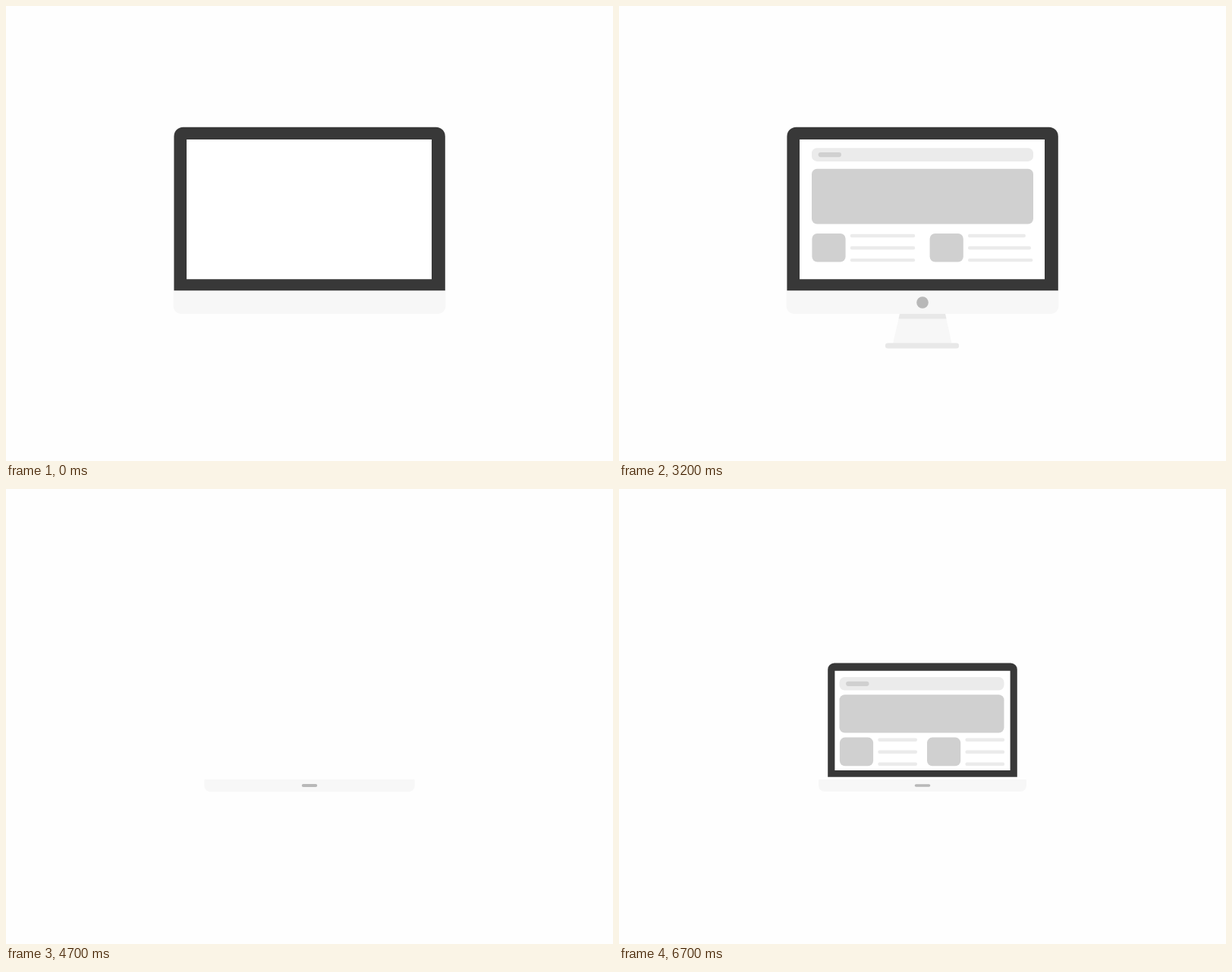
An HTML page with a canvas that plays this animation: 800 by 600 pixels, repeating every 8000 ms.

```html
<!DOCTYPE html>
<html lang="en">
<head>
<meta charset="utf-8">
<title>Desktop to laptop</title>
<style>
  html, body { margin: 0; width: 100%; height: 100%; overflow: hidden; background: #fefefe; }
  canvas { display: block; width: 800px; height: 600px; }
</style>
</head>
<body>
<canvas id="stage" width="800" height="600"></canvas>
<script>
const ctx = document.getElementById('stage').getContext('2d');
const LOOP = 8000, STEP = 100;
const DARK = '#383838', PALE = '#f7f7f7', LIGHT = '#ebebeb', MID = '#d0d0d0', KNOB = '#b8b8b8';

const progress = (t, start, length) => Math.min(1, Math.max(0, (t - start) / length));
const easeOut = p => 1 - (1 - p) ** 2;
const easeIn = p => p * p;
const mix = (a, b, p) => a + (b - a) * p;

function box(x, y, w, h, radii, color) {
  if (w <= 0 || h <= 0) return;
  ctx.fillStyle = color;
  ctx.beginPath();
  ctx.roundRect(x, y, w, h, radii);
  ctx.fill();
}

function polygon(color, ...points) {
  ctx.fillStyle = color;
  ctx.beginPath();
  points.forEach(([x, y]) => ctx.lineTo(x, y));
  ctx.fill();
}

// Draws a box scaled about the point (ox, oy), given as fractions of its size.
function scaledBox(x, y, w, h, r, color, sx, sy, ox, oy) {
  if (sx <= 0 || sy <= 0) return;
  ctx.save();
  ctx.translate(x + w * ox, y + h * oy);
  ctx.scale(sx, sy);
  box(-w * ox, -h * oy, w, h, r, color);
  ctx.restore();
}

const growRight = (x, y, w, h, r, color, s) => scaledBox(x, y, w, h, r, color, s, 1, 0, 0);
const growTall = (x, y, w, h, r, color, s) => scaledBox(x, y, w, h, r, color, 1, s, 0.5, 0.5);
const pop = (x, y, w, h, r, color, s) => scaledBox(x, y, w, h, r, color, s, s, 0.5, 0.5);

const enterAt = {
  nav: 0, hero: 190, label: 250,
  tiles: [400, 720],
  lines: [[500, 550, 600], [800, 850, 900]]
};
const leaveAt = {
  nav: 580, hero: 378, label: 300,
  tiles: [280, 120],
  lines: [[230, 280, 332], [0, 50, 100]]
};

const desktopPage = { x: 254, y: 187.3, w: 292, heroY: 214.7, heroH: 72.8, tileY: 299.9, column: 155.2, lineW: 85.3 };
const laptopPage = { x: 290.5, y: 248, w: 217, heroY: 271.3, heroH: 50.2, tileY: 327.6, column: 115.1, lineW: 51.7 };

function page(p, t, enter, leave = Infinity) {
  const size = (inDelay, outDelay) =>
    easeOut(progress(t, enter + inDelay, 300)) *
    (leave === Infinity ? 1 : 1 - easeIn(progress(t, leave + outDelay, 300)));
  const at = key => size(enterAt[key], leaveAt[key]);

  growRight(p.x, p.y, p.w, 17.6, 7, LIGHT, at('nav'));
  pop(p.x + 8.6, p.y + 5.7, 30.4, 6.2, 3.1, MID, at('label'));
  growTall(p.x, p.heroY, p.w, p.heroH, 7, MID, at('hero'));
  for (let c = 0; c < 2; c++) {
    const x = p.x + c * p.column;
    pop(x + 0.4, p.tileY, 44.2, 37.6, 7, MID, size(enterAt.tiles[c], leaveAt.tiles[c]));
    for (let i = 0; i < 3; i++) {
      growRight(x + 50.8, p.tileY + 0.9 + 16.05 * i, p.lineW, 4.4, 2, LIGHT,
        size(enterAt.lines[c][i], leaveAt.lines[c][i]));
    }
  }
}

function stand(t) {
  const out = easeOut(progress(t, 100, 300)) - easeIn(progress(t, 4000, 290));
  if (out <= 0) return;
  ctx.save();
  ctx.translate(0, -46 * (1 - out));
  polygon(PALE, [370, 406], [430, 406], [438.5, 445], [361, 445]);
  polygon('#e8e8e8', [370, 406], [430, 406], [431.5, 412.5], [368.5, 412.5]);
  box(351, 444.6, 97, 6.8, 3, '#e8e8e8');
  ctx.restore();
}

function monitor(t) {
  const top = mix(159.8, 375.6, easeIn(progress(t, 3863, 450)));
  box(221.4, top, 357.4, 375.6 - top, [12, 12, 0, 0], DARK);
  box(238, top + 16.2, 323, 360.2 - top - 16.2, 0, '#fff');
  page(desktopPage, t, 500, 3100);
}

function foot(t) {
  const p = easeOut(progress(t, 4300, 500));
  const halfW = mix(179.3, 137, p), top = mix(375.6, 383, p), bottom = mix(406, 399, p);
  const r = mix(10, 8, p);
  box(400 - halfW, top, halfW * 2, bottom - top, [1, 1, r, r], PALE);

  const shown = easeOut(progress(t, 100, 300));
  const w = mix(15.6, 20.6, p) * shown, h = mix(15.6, 3.4, p) * shown;
  box(400 - w / 2, 391 - h / 2, w, h, h / 2, KNOB);
}

function lid(t) {
  const rise = easeOut(progress(t, 4900, 400));
  if (!rise) return;
  const spread = 16.5 * Math.sqrt(1 - rise * rise);
  const bottom = 379.8, top = bottom - 150.3 * rise;
  const left = 275.2 - spread, right = 524.8 + spread, r = 9;
  ctx.fillStyle = DARK;
  ctx.beginPath();
  ctx.moveTo(275.2, bottom);
  ctx.arcTo(left, top, left + r, top, r * 0.95);
  ctx.arcTo(right, top, 524.8, bottom, r * 0.95);
  ctx.lineTo(524.8, bottom);
  ctx.fill();

  ctx.globalAlpha = progress(t, 5200, 300);
  box(284.4, 239.8, 231.2, 131.3, 0, '#fff');
  ctx.globalAlpha = 1;
  page(laptopPage, t, 5500);
}

function draw(now) {
  const t = Math.floor((now % LOOP) / STEP) * STEP;
  ctx.fillStyle = '#fefefe';
  ctx.fillRect(0, 0, 800, 600);
  stand(t);
  monitor(t);
  foot(t);
  lid(t);
}

let began;
function tick(now) {
  began ??= now;
  draw(Math.max(0, now - began));
  requestAnimationFrame(tick);
}
draw(0);
requestAnimationFrame(tick);
</script>
</body>
</html>
```
